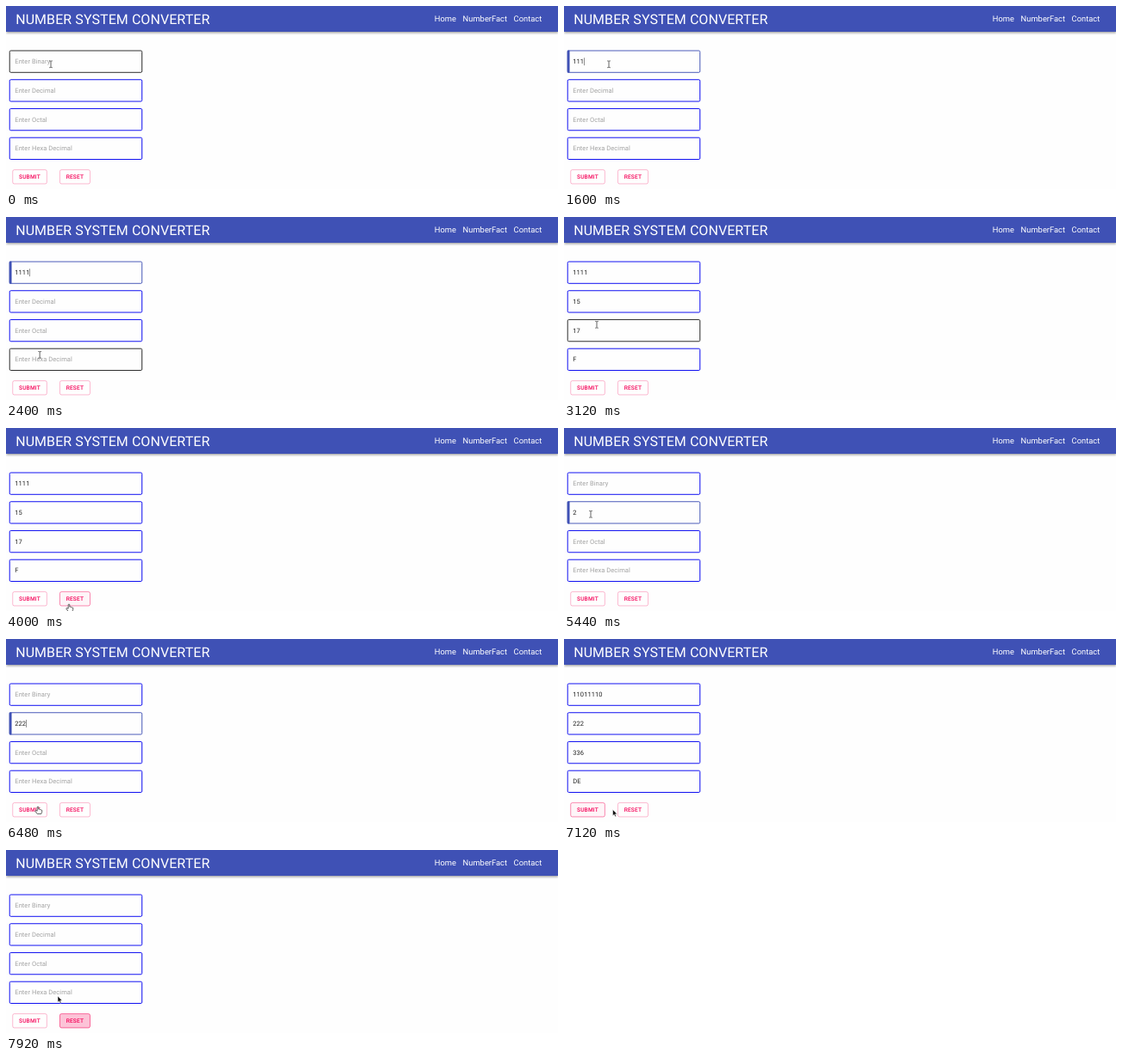
Write an HTML page that moves like this. It is 640 px wide and 213 px high and loops after 8 s.

```html
<!DOCTYPE html>
<html lang="en">
<head>
<meta charset="utf-8">
<title>Number System Converter</title>
<style>
  html, body { margin: 0; width: 100%; height: 100%; overflow: hidden; background: #fefefe; }
  body { position: relative; font-family: Roboto, sans-serif; text-rendering: geometricPrecision; }
  header {
    position: absolute; left: 0; top: 0; width: 640px; height: 30px; background: #3f51b5;
    box-shadow: 0 1px 2px -.5px rgba(0,0,0,.2), 0 2px 2.3px rgba(0,0,0,.14), 0 .5px 4.7px rgba(0,0,0,.12);
  }
  svg { position: absolute; left: 0; top: 0; width: 640px; height: 213px; }
  .title { font-size: 15.93px; letter-spacing: .00735em; fill: #fff; }
  .nav { font-size: 9.37px; fill: #fff; text-anchor: end; }
  .field text { font-size: 7.5px; letter-spacing: .00938em; }
  .button text { font-size: 6.56px; font-weight: 500; letter-spacing: .02857em; fill: #f50057; }
  .outline { fill: none; stroke-width: .94; }
</style>
</head>
<body>
<header></header>
<svg id="stage" viewBox="0 0 640 213">
  <text class="title" x="11.2" y="20.6">NUMBER SYSTEM CONVERTER</text>
  <text class="nav" x="521.9" y="18.3">Home</text>
  <text class="nav" x="581.1" y="18.3">NumberFact</text>
  <text class="nav" x="621.3" y="18.3">Contact</text>
</svg>
<script>
const LOOP = 8000, STEP = 80, BLINK = 480;
const stage = document.getElementById('stage');

function add(parent, tag, attrs = {}, text = '') {
  const node = document.createElementNS('http://www.w3.org/2000/svg', tag);
  set(node, attrs);
  node.textContent = text;
  return parent.appendChild(node);
}
function set(node, attrs) {
  for (const key in attrs) node.setAttribute(key, attrs[key]);
}
const show = (node, on) => set(node, { visibility: on ? 'visible' : 'hidden' });

const fields = ['Binary', 'Decimal', 'Octal', 'Hexa Decimal'].map((name, i) => {
  const x = 3.75, y = 51.54 + i * 33.73, w = 154.4, h = 26.24;
  const g = add(stage, 'g', { class: 'field' });
  return {
    x, y, w, h, kind: 'beam', hint: 'Enter ' + name,
    outline: add(g, 'rect', { class: 'outline', x: x + .47, y: y + .47, width: w - .94, height: h - .94, rx: 1.4 }),
    bar: add(g, 'rect', { x, y, width: 2.8, height: h, rx: 1, fill: '#3f51b5' }),
    label: add(g, 'text', { x: 10.3, y: y + 15.65 }),
    caret: add(g, 'rect', { y: y + 8.7, width: .5, height: 8.9, fill: '#222' })
  };
});

const buttons = [['SUBMIT', 7.5, 40.1], ['RESET', 62.2, 35.5]].map(([name, x, w]) => {
  const g = add(stage, 'g', { class: 'button' }), y = 190.4, h = 16.8;
  const box = add(g, 'rect', {
    x: x + .25, y: y + .25, width: w - .5, height: h - .5, rx: 1.9,
    fill: '#f50057', stroke: '#f50057', 'stroke-width': .55
  });
  add(g, 'text', { x: x + 7.5, y: 201.1 }, name);
  return { x, y, w, h, kind: 'hand', box };
});

// Pointers, each with its hot spot at 0,0
const ink = { stroke: '#222', 'stroke-width': .7, fill: 'none', 'stroke-linejoin': 'round' };
const pointers = { beam: add(stage, 'g', ink), hand: add(stage, 'g', ink), arrow: add(stage, 'g') };
add(pointers.beam, 'path', { d: 'M-1.8-3.6Q-.3-3.6 0-3Q.3-3.6 1.8-3.6M0-3V3.6M-1.8 4.2Q-.3 4.2 0 3.6Q.3 4.2 1.8 4.2' });
add(pointers.hand, 'path', {
  fill: '#fff',
  d: 'M-.8 5.2V.5Q0-.6.8.5V3.2Q1.8 2.6 2.3 3.6Q3.2 3 3.6 4Q4.7 3.6 4.7 4.8V6.4L3.8 8.6H-.6L-3 5.7Q-3.2 4.3-2 4.6Z'
});
add(pointers.arrow, 'path', {
  d: 'M0 0V7.3L1.7 5.8L2.8 8.3L4 7.8L2.9 5.3H5.1Z', fill: '#111', stroke: '#fff', 'stroke-width': .5
});

const path = [
  [0, 52, 67.5], [2000, 52, 67.5], [2560, 34, 197], [2800, 35, 199], [3120, 38, 125],
  [3280, 42, 98], [3600, 42, 98], [3840, 72, 203], [4000, 73, 205], [4160, 73, 205],
  [4640, 33, 103], [4720, 31, 100], [6000, 31, 100], [6480, 37, 195], [6640, 36, 199],
  [6800, 36, 199], [7440, 77, 198], [7520, 76, 196], [7680, 76, 196], [7920, 60, 170],
  [8000, 60, 170]
];

// time, field values, focused field
const empty = ['', '', '', ''];
const states = [
  [0, empty, -1], [640, empty, 0],
  [1280, ['1', '', '', ''], 0], [1440, ['11', '', '', ''], 0],
  [1600, ['111', '', '', ''], 0], [2000, ['1111', '', '', ''], 0],
  [2640, ['1111', '', '', ''], -1], [2720, ['1111', '15', '17', 'F'], -1],
  [4240, empty, -1], [4720, empty, 1],
  [4960, ['', '2', '', ''], 1], [5520, ['', '22', '', ''], 1], [6080, ['', '222', '', ''], 1],
  [6640, ['', '222', '', ''], -1], [6880, ['11011110', '222', '336', 'DE'], -1],
  [7760, empty, -1]
];

// button, press time
const presses = [[0, 2640], [1, 4160], [0, 6640], [1, 7760]];
const HELD = 7760;

function pointerAt(t) {
  const i = Math.max(1, path.findIndex(p => p[0] > t));
  const [t0, x0, y0] = path[i - 1], [t1, x1, y1] = path[i];
  const k = (t - t0) / (t1 - t0);
  return { x: x0 + (x1 - x0) * k, y: y0 + (y1 - y0) * k };
}

function overAt(t) {
  if (t >= HELD) return buttons[1];
  const p = pointerAt(Math.max(0, t));
  return [...fields, ...buttons].find(b => p.x > b.x && p.x < b.x + b.w && p.y > b.y && p.y < b.y + b.h);
}

function ripple(button, t) {
  let level = 0;
  for (const [b, start] of presses) {
    const age = t - start;
    if (b !== button || age < 0) continue;
    level = Math.max(level, .18 * Math.min((age + STEP) / 240, 1, Math.max(0, (480 - age) / 240)));
  }
  return level;
}

function draw(t) {
  const over = overAt(t);
  const [since, values, focus] = states.filter(s => s[0] <= t).pop();

  fields.forEach((f, i) => {
    const focused = i === focus, value = values[i];
    set(f.outline, { stroke: focused ? '#3f51b5' : f === over ? '#212121' : '#0000f0' });
    show(f.bar, focused);
    f.label.textContent = value || f.hint;
    set(f.label, { fill: value ? '#222' : '#a2a2a2' });
    const lit = focused && Math.floor((t - since) / BLINK) % 2 === 0;
    show(f.caret, lit);
    if (lit) set(f.caret, { x: 10.3 + (value ? f.label.getComputedTextLength() : 0) });
  });

  // Hover fades in and out over the three steps that follow
  buttons.forEach((b, i) => {
    const hover = [1, 2, 3].filter(n => overAt(t - n * STEP) === b).length / 3;
    set(b.box, { 'fill-opacity': .05 * hover + ripple(i, t), 'stroke-opacity': .5 + .5 * hover });
  });

  const { x, y } = pointerAt(t);
  const kind = t >= HELD || !over ? 'arrow' : over.kind;
  for (const name in pointers) {
    show(pointers[name], name === kind);
    set(pointers[name], { transform: `translate(${x} ${y})` });
  }
}

const start = performance.now();
function tick() {
  const t = (performance.now() - start) % LOOP;
  draw(Math.floor(t / STEP) * STEP);
  requestAnimationFrame(tick);
}
tick();
</script>
</body>
</html>
```
